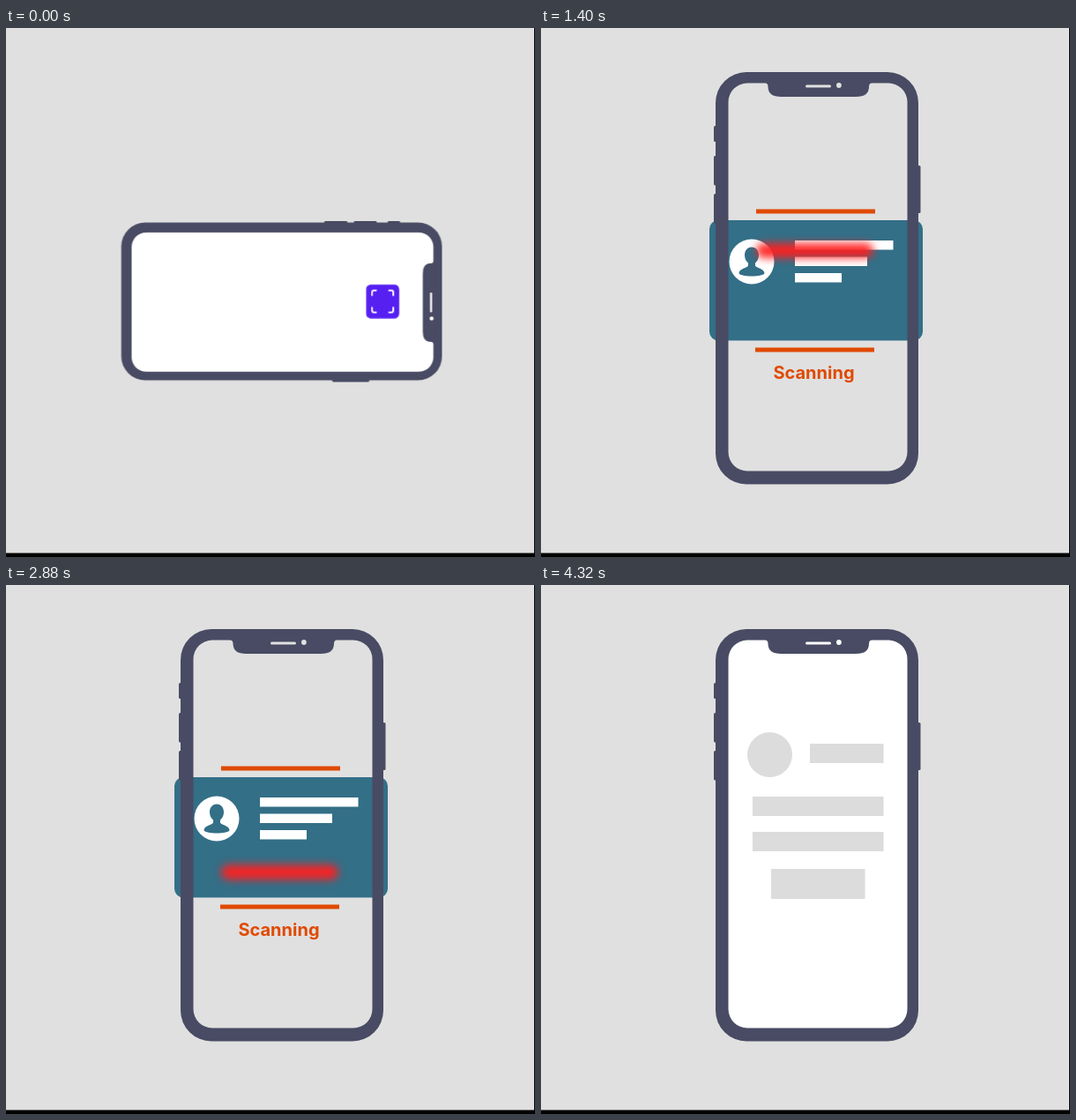
An HTML page without scripts that plays this animation: 600 by 600 pixels, repeating every 4560 ms.

```html
<!DOCTYPE html>
<html lang="en">
<head>
<meta charset="utf-8">
<title>Card scan</title>
<style>
  html, body { margin: 0; width: 100%; height: 100%; overflow: hidden; background: #e0e0e0; }
  svg { display: block; width: 100vw; height: 100vh; }

  .turn, .zoom, .icon, .lines, .glass, .scan, .card, .glow, .sweep, .field {
    animation: 4.56s linear infinite;
  }
  .turn, .zoom { transform-origin: 300px 300px; }
  .turn  { animation-name: turn; }
  .zoom  { animation-name: zoom; }
  .icon  { animation-name: icon; }
  .lines { animation-name: lines; }
  .card  { animation-name: card; }
  .sweep { animation-name: sweep; }
  .glass, .scan, .glow, .field { animation-timing-function: step-end; }
  .glass { animation-name: glass; }
  .scan  { animation-name: scan; }
  .glow  { animation-name: glow; }
  .name   { animation-name: name; }
  .photo  { animation-name: photo; }
  .row1   { animation-name: row1; }
  .row2   { animation-name: row2; }
  .button { animation-name: button; }

  .body { fill: #484b63; }
  .lines { stroke: #e04a00; stroke-width: 5; }
  .scan { fill: #e04a00; font: 700 20px Inter, sans-serif; text-anchor: middle; }
  .teal { fill: #336f87; }
  .field { fill: #dcdcdc; }
  .sweep { fill: #ff2020; fill-opacity: .95; filter: blur(5px); }

  @keyframes turn {
    0% { transform: rotate(90deg); animation-timing-function: cubic-bezier(.65, 0, .35, 1); }
    9.65%, 100% { transform: rotate(0deg); }
  }
  @keyframes zoom {
    0%, 9.65% { transform: scale(.778); animation-timing-function: cubic-bezier(.65, 0, .35, 1); }
    16.23%, 100% { transform: scale(1); }
  }
  @keyframes icon {
    0%, 16.67% { opacity: 1; }
    19.3%, 100% { opacity: 0; }
  }
  @keyframes lines {
    0%, 18.42% { opacity: 0; }
    21.05%, 74.53% { opacity: 1; }
    74.54%, 100% { opacity: 0; }
  }
  @keyframes card {
    0%, 22.8% {
      transform: translateX(-242px); opacity: 0;
      animation-timing-function: cubic-bezier(.33, 1, .68, 1);
    }
    28.95% { transform: none; opacity: 1; }
    69.3% { transform: none; opacity: 1; animation-timing-function: cubic-bezier(.4, .2, .7, .7); }
    71.93% { transform: translateX(171px); opacity: .75; }
    73.68% { transform: translateX(340px); opacity: .5; }
    74.53% { transform: translateX(409px); opacity: .4; }
    74.54%, 100% { transform: translateX(409px); opacity: 0; }
  }
  @keyframes sweep {
    0%, 28.07%, 50%, 71.93% { transform: none; }
    39.04%, 60.96% { transform: translateY(132px); }
    74.56%, 100% { transform: translateY(32px); }
  }
  @keyframes glass { 0% { opacity: 1; } 22.8% { opacity: 0; } 73.66%, 100% { opacity: 1; } }
  @keyframes scan  { 0% { opacity: 0; } 22.8% { opacity: 1; } 74.54%, 100% { opacity: 0; } }
  @keyframes glow  { 0% { opacity: 0; } 28.05% { opacity: 1; } 74.54%, 100% { opacity: 0; } }
  @keyframes name   { 0% { opacity: 0; } 78.05%, 100% { opacity: 1; } }
  @keyframes photo  { 0% { opacity: 0; } 81.56%, 100% { opacity: 1; } }
  @keyframes row1   { 0% { opacity: 0; } 85.94%, 100% { opacity: 1; } }
  @keyframes row2   { 0% { opacity: 0; } 89.45%, 100% { opacity: 1; } }
  @keyframes button { 0% { opacity: 0; } 94.72%, 100% { opacity: 1; } }
</style>
</head>
<body>
<svg viewBox="0 0 600 600">
  <rect width="600" height="600" fill="#e0e0e0"/>

  <g class="turn"><g class="zoom">
    <rect class="glass" x="205" y="56" width="217" height="453" rx="28" fill="#fff"/>
  </g></g>

  <g class="card">
    <rect class="teal" x="191" y="218" width="242" height="136.5" rx="10"/>
    <circle cx="239" cy="265" r="25.5" fill="#fff"/>
    <path class="teal" d="M239 248.5c5 0 8 4 8 9 0 4-1.500 7-4 9v3c1 3 10 3 10.500 8.500 0 2-7 3.500-14.500 3.500s-14.500-1.500-14.500-3.500c.5-5.500 9.500-5.500 10.500-8.500v-3c-2.500-2-4-5-4-9 0-5 3-9 8-9z"/>
    <path fill="#fff" d="M288 241h111.500v10.500H288zM288 259.500h82v10.500H288zM288 278h53v10.500H288z"/>
  </g>

  <g class="turn"><g class="zoom">
    <g class="body">
      <rect x="196" y="111" width="6" height="18" rx="1.5"/>
      <rect x="196" y="145" width="6" height="33.5" rx="1.5"/>
      <rect x="196" y="188" width="6" height="33.5" rx="1.5"/>
      <rect x="424" y="156" width="6.5" height="54" rx="1.5"/>
      <!-- shell with openings for screen, speaker and camera -->
      <path fill-rule="evenodd" d="
        M233 50H393a35 35 0 0 1 35 35V482.500a35 35 0 0 1-35 35H233a35 35 0 0 1-35-35V85a35 35 0 0 1 35-35z
        M234 62.500H254q3.500 0 3.500 4 0 11.500 15 11.500H357q15 0 15-11.500 0-4 3.500-4H394a21.500 21.500 0 0 1 21.500 21.500V481a21.500 21.500 0 0 1-21.500 21.500H234a21.500 21.500 0 0 1-21.500-21.500V84a21.500 21.500 0 0 1 21.500-21.500z
        M301.500 64.500H327.500a1.500 1.500 0 0 1 0 3H301.500a1.500 1.500 0 0 1 0-3z
        M335 65a2.900 2.900 0 0 1 5.800 0 2.900 2.900 0 0 1-5.800 0z"/>
    </g>
    <g class="icon">
      <rect x="288.4" y="112.3" width="49.5" height="48.2" rx="7" fill="#5720f2"/>
      <path fill="none" stroke="#fff" stroke-width="2.4" d="
        M297 128v-4q0-3 3-3h5M321 121h5q3 0 3 3v4
        M329 145v4q0 3-3 3h-5M305 152h-5q-3 0-3-3v-4"/>
    </g>
  </g></g>

  <path class="lines" d="M244 208H379M243 365H378"/>
  <text class="scan" x="309.5" y="398">Scanning</text>
  <g class="glow"><rect class="sweep" x="244" y="212" width="133" height="17" rx="8.5"/></g>

  <rect class="field name" x="305" y="180" width="83.5" height="22"/>
  <circle class="field photo" cx="259.5" cy="192.5" r="25.5"/>
  <rect class="field row1" x="240" y="240" width="148.5" height="22"/>
  <rect class="field row2" x="240" y="280" width="148.5" height="22"/>
  <rect class="field button" x="261" y="322" width="106.5" height="34"/>

  <path d="M0 595.500H599V0H600V600H0z"/>
</svg>
</body>
</html>
```
